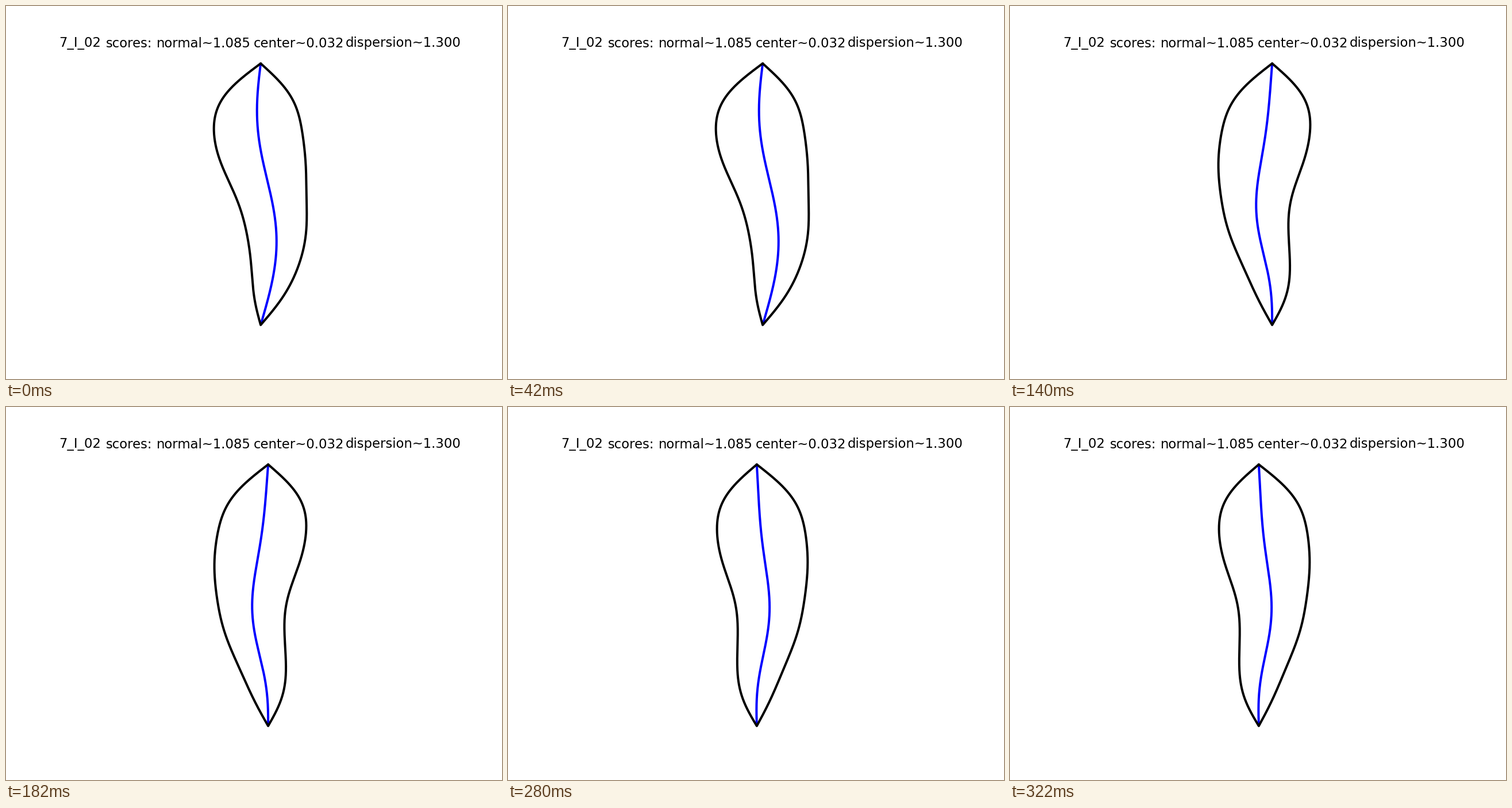
A matplotlib script that plays this animation: 863 px wide and 649 px high, repeating every 0.35 s.

```python
import numpy as np
import matplotlib.pyplot as plt
from matplotlib.animation import FuncAnimation

W, H, DPI = 863, 649, 128
PT = 72 / DPI  # points per pixel
TOP, BOTTOM, CENTER = 100, 555, 442.5

fig = plt.figure(figsize=(W / DPI, H / DPI), dpi=DPI, facecolor="white")
ax = fig.add_axes([0, 0, 1, 1])
ax.set_xlim(0, W)
ax.set_ylim(H, 0)
ax.axis("off")

TITLE = [(92, "7_I_02"), (174, "scores:"), (261.5, "normal~1.085"),
         (431, "center~0.032"), (591, "dispersion~1.300")]
for x, word in TITLE:
    ax.text(x, 71.5, word, fontsize=22.7 * PT, family="DejaVu Sans",
            color="black", ha="left", va="baseline")

u = np.linspace(0, 1, 300)
y = TOP + (BOTTOM - TOP) * u


def sines(*amps):
    """Sum of standing waves that vanish at both tips."""
    return sum(a * np.sin(n * np.pi * u) for n, a in enumerate(amps, 1))


# Every pose has the same half width; only the bend of the midline changes.
half = sines(74.4, 17.2, 13.2, 2.2, 2.1, 0.7, 0.8)
BENDS = [
    (16.0, -15.5, -1.2, 0.3),
    (-16.1, -24.0, 4.9, -1.3),
    (-21.7, 1.2, 5.5, -1.9),
    (10.4, 13.4, -2.3, -1.5),
    (16.6, -1.1, -4.9, 2.0),
]

midline, = ax.plot([], [], color="blue", lw=4 * PT, solid_capstyle="butt")
outline, = ax.plot([], [], color="black", lw=4 * PT,
                   solid_joinstyle="round", solid_capstyle="round")
outline_y = np.concatenate([y, y[::-1]])


def draw(i):
    bend = sines(*BENDS[i])
    left, right = bend - half, bend + half
    # Keep the whole outline centred on the stage.
    shift = CENTER - (left.min() + right.max()) / 2
    midline.set_data(bend + shift, y)
    outline.set_data(np.concatenate([left, right[::-1]]) + shift, outline_y)
    return midline, outline


anim = FuncAnimation(fig, draw, frames=len(BENDS), interval=70,
                     repeat=True, repeat_delay=0)
plt.show()
```
